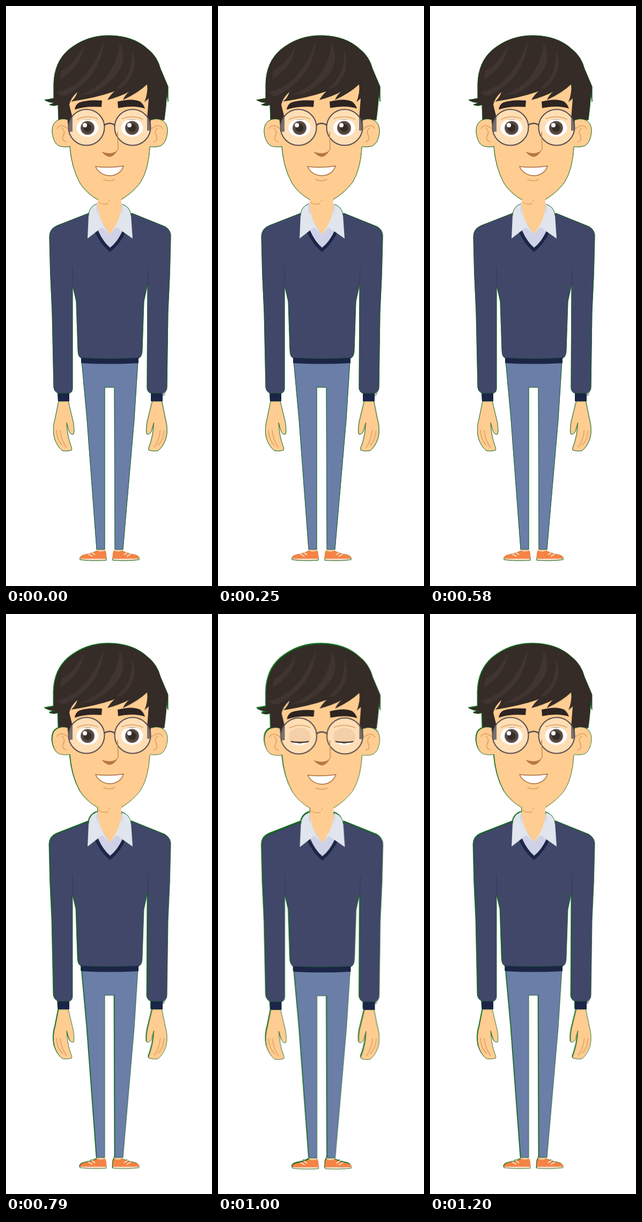
Write an HTML page that moves like this. It is 384x1080 px and loops after 1.3 s.

```html
<!DOCTYPE html>
<html lang="en">
<head>
<meta charset="utf-8">
<title>Blinking man</title>
<style>
  html, body { margin: 0; width: 100%; height: 100%; overflow: hidden; background: #fff; }
  svg { display: block; width: 100%; height: 100%; }
  .edge { stroke: #14611f; stroke-width: .8; }
  .skin { fill: #ffcd91; }
  .hair { fill: #352b27; }
  .navy { fill: #1b2547; }
  .tan { fill: none; stroke: #dc9f62; stroke-width: 1.5; stroke-linecap: round; }
  .streak { fill: #403530; }
  .frame { fill: #fff; fill-opacity: .33; stroke: #594c50; stroke-width: 2; }
</style>
</head>
<body>
<svg viewBox="0 0 384 1080">
  <defs>
    <clipPath id="eyeShape"><ellipse rx="20.5" ry="16.5"/></clipPath>
    <g id="hand">
      <path class="skin edge" d="M98 736L92 766Q86 786 90 804Q95 820 105 828Q114 830 122 827Q124 824 121 819Q114 800 113 776L117 790Q120 799 126 797Q128 790 125 773L116 736Z"/>
      <path class="tan" d="M94 790Q95 808 105 818M101 790Q102 806 112 822"/>
    </g>
    <g id="shoe">
      <path fill="#f2cfaa" d="M169 1010H184V1018H169Z"/>
      <path class="edge" fill="#f3d9c0" d="M138 1027H187V1032Q160 1034 138 1031Z"/>
      <path fill="#f58345" d="M169 1014Q177 1018 185 1014Q188 1021 187 1029H138Q137 1023 148 1021Q161 1019 169 1014Z"/>
      <path d="M153 1020L161 1025M159 1017L166 1022" stroke="#fae3cc" stroke-width="2"/>
    </g>
    <g id="ear">
      <path class="skin edge" d="M121 214Q108 208 98 212Q85 217 86 235Q88 254 98 260Q108 264 122 261Z"/>
      <path class="tan" d="M116 229Q102 217 95 228M104 227Q112 233 106 243Q104 251 112 253"/>
    </g>
    <g id="eye" clip-path="url(#eyeShape)">
      <path fill="#fff" d="M-22-18H22V18H-22Z"/>
      <circle r="13" fill="#6b5b53"/>
      <circle r="11.5" fill="#54463f"/>
      <circle r="7.5" fill="#352c29"/>
      <circle cx="-5" cy="-5" r="4" fill="#fff"/>
      <path class="lid" fill="#f4cfa8"/>
      <path class="lash" fill="none" stroke="#473a35" stroke-width="2.5"/>
    </g>
  </defs>

  <g id="man">
    <use href="#hand"/>
    <use href="#hand" transform="matrix(-1 0 0 1 388.5 0)"/>
    <use href="#shoe"/>
    <use href="#shoe" transform="matrix(-1 0 0 1 386 0)"/>

    <path class="edge" fill="#6a7ea8" d="M141 660H246L239 770L218 1012H203L202 710H184V1012H169L151 770Z"/>
    <path class="navy" d="M96 718H118V736H97ZM270 718H292V736H270Z"/>
    <path d="M293 726L297 717" stroke="#b6aabd" stroke-width="3"/>
    <path class="edge" fill="#404769" d="M154 386L95 409Q81 415 81 430Q82 500 86 570L89 710Q90 718 97 721H118Q124 719 124 712V520L131 550L134 640Q134 655 142 656H247Q254 653 254 640L257 550L264 518L263 712Q264 719 270 721H292Q300 718 300 710L302 570Q306 500 307 430Q308 418 297 411L235 386Q194 400 154 386Z"/>
    <path d="M124 485V522M265 485L264 520" stroke="#343c61" stroke-width="1.2"/>
    <path class="navy" d="M140 655Q194 658 247 655V665Q194 668 140 665Z"/>

    <path class="navy" d="M164 417Q176 444 194 458Q212 444 225 417Z"/>
    <path fill="#cfd2e6" d="M168 371Q194 390 220 371L217 419Q208 439 194 450Q181 439 172 419Z"/>
    <path class="skin" d="M171 340H215V380Q213 400 194 425Q175 400 171 380Z"/>
    <path fill="#e1e5ed" d="M170 368Q154 374 154 390L152 433L179 412L193 425Q173 402 170 368ZM216 369Q232 374 233 390L236 433L206 412L193 425Q213 402 216 369Z"/>
    <path fill="#cfd2e6" d="M170 370Q166 379 172 390L171 370ZM216 370Q220 380 214 390Z"/>
    <path class="edge" fill="none" d="M170 368Q154 374 154 390M216 369Q232 374 233 390"/>

    <path class="hair edge" d="M72 175L89 172V145Q90 105 116 82Q150 54 194 55Q238 56 264 80Q282 94 288 117L302 150V178L300 163Q298 190 295 212H98L97 184Q90 187 81 184L90 180Q80 180 72 175Z"/>
    <use href="#ear"/>
    <use href="#ear" transform="matrix(-1 0 0 1 387 0)"/>
    <path class="skin" d="M118 180L133 145H264L268 205L269 255Q268 301 251 328Q237 347 214 362H172Q150 349 138 330Q122 301 119 255Z"/>
    <path class="edge" fill="none" d="M119 262Q122 301 138 330Q150 349 172 361M268 262Q266 303 251 328Q237 347 215 360"/>
    <path class="tan" d="M172 365Q180 371 190 368M193 361V363"/>
    <path class="hair" d="M110 150L180 100L268 142L270 232H263V210L266 172L258 179Q265 162 263 146Q246 162 218 175Q221 167 229 160Q212 169 189 175Q194 166 202 159Q168 171 121 178Q130 171 133 160Q120 172 118 184L124 208V234H117L112 190Z"/>

    <g class="streak">
      <path d="M95 160Q154 148 183 63Q178 133 111 167Q101 170 95 160Z"/>
      <path d="M103 120Q130 106 144 74Q143 110 101 137Z"/>
      <path d="M136 166Q202 143 212 69Q238 121 160 164Z"/>
      <path d="M204 154Q238 129 235 81Q250 124 216 152Z"/>
    </g>

    <g id="brows" fill="#2d2422">
      <path d="M128 193Q129 184 136 180Q151 174 179 176L178 188Q149 186 128 193Z"/>
      <path d="M209 190L208 178Q236 171 250 178Q256 182 259 191Q238 184 209 190Z"/>
    </g>

    <circle class="frame" cx="150" cy="226" r="33.5"/>
    <circle class="frame" cx="236" cy="226" r="33.5"/>
    <path d="M183 222Q193 215 203 222" fill="none" stroke="#594c50" stroke-width="2.5"/>
    <path class="tan" d="M133 211Q151 202 171 210M216 210Q236 202 255 211"/>
    <use href="#eye" x="152" y="227"/>
    <use href="#eye" x="235" y="227"/>

    <path d="M208 234L209 266Q205 274 197 279" fill="none" stroke="#c98b52" stroke-width="1.5"/>
    <path fill="#b77742" d="M178 271Q193 278 207 270Q200 281 193 281Q184 279 178 271Z"/>
    <path fill="#fff" stroke="#ad6b3a" stroke-width="1.5" d="M167 299Q193 302 219 298Q213 315 194 316Q174 315 167 299Z"/>
    <path class="tan" d="M182 323Q192 328 203 323"/>
  </g>
</svg>
<script>
  const LOOP = 1300, STEP = 1000 / 24;
  const man = document.getElementById('man');
  const brows = document.getElementById('brows');
  const lid = document.querySelector('.lid');
  const lash = document.querySelector('.lash');

  function smooth(from, to, x) {
    const p = Math.min(1, Math.max(0, (x - from) / (to - from)));
    return p * p * (3 - 2 * p);
  }

  function draw(now) {
    const step = Math.min(29, Math.floor((now % LOOP + 9) / STEP));
    const closed = smooth(18.8, 23, step) - smooth(24, 29.3, step);
    const y = -15 + 23 * closed;
    const curve = `${y}Q0 ${y - 3 + 9 * closed} -24 ${y}`;
    lid.setAttribute('d', `M-24-24H24V${curve}Z`);
    lash.setAttribute('d', `M24 ${curve}`);
    lash.setAttribute('opacity', 0.4 + 0.6 * closed);
    brows.setAttribute('transform', `translate(0 ${2 * closed})`);
    // The body sinks slightly during the blink and uncovers a green rim.
    man.setAttribute('transform', `translate(${0.5 * closed} ${closed})`);
    man.style.filter = `drop-shadow(${-closed}px ${-1.5 * closed}px 0 #0b6b18)`;
    requestAnimationFrame(draw);
  }
  draw(performance.now());
</script>
</body>
</html>
```
